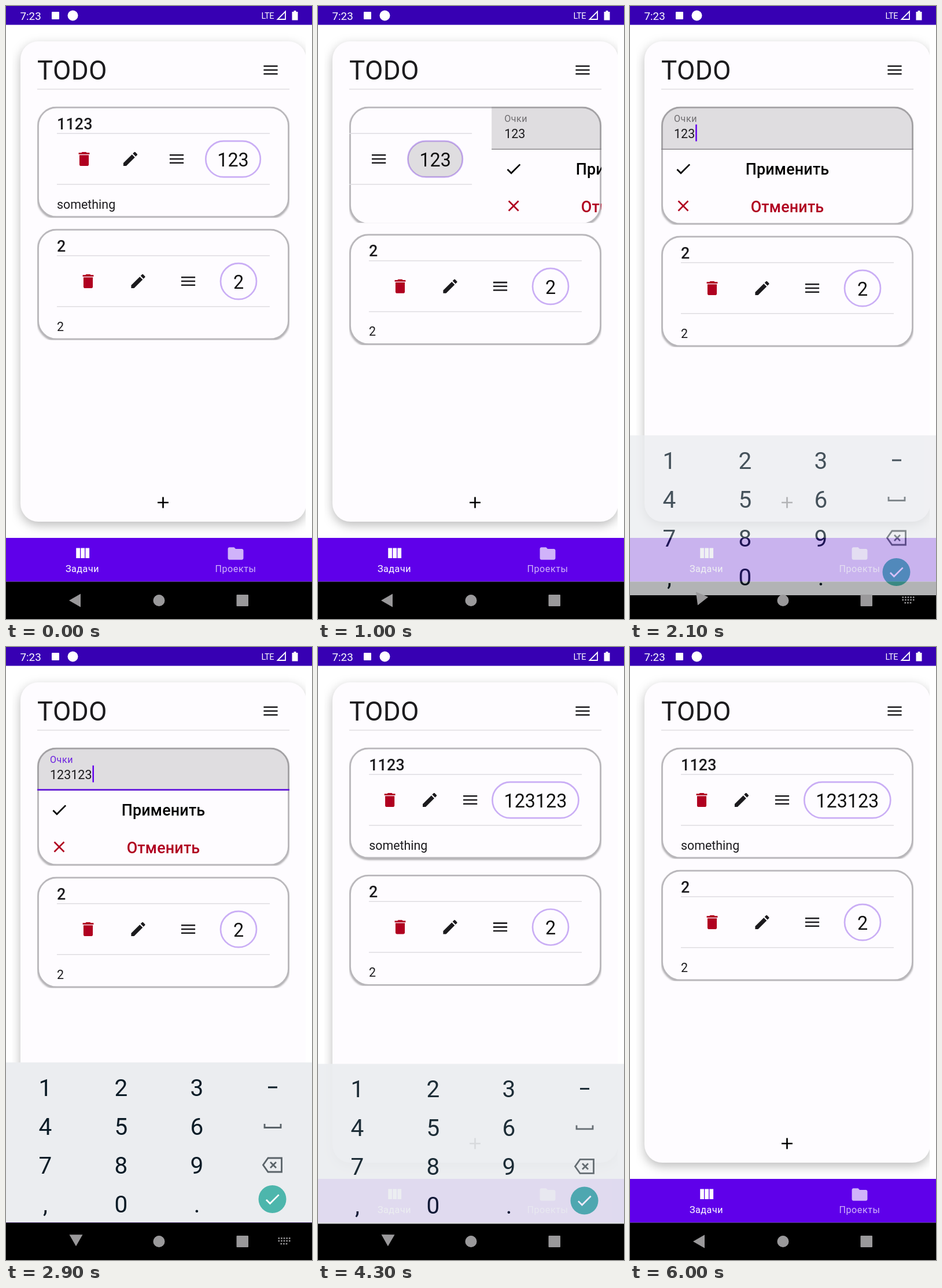
An HTML page for the animation above (6100 ms loop, 529 px wide and 1058 px high).

```html
<!DOCTYPE html>
<html lang="ru">
<head>
<meta charset="utf-8">
<title>TODO</title>
<style>
html, body { margin: 0; width: 100%; height: 100%; overflow: hidden; background: #fff; }
svg { font-family: Roboto, "Noto Sans", sans-serif; }
#stage { display: block; width: 100vw; height: 100vh; }
.sheet { filter: drop-shadow(0 6px 9px #0004); }
.card { filter: drop-shadow(0 2px 1.5px #0005); }
.mid { text-anchor: middle; }
</style>
</head>
<body>
<svg id="stage" viewBox="0 0 529 1058"></svg>
<script>
const LOOP = 6100, WIDTH = 436, LOW = 192, HIGH = 204;
const INK = '#1c1b1e', RED = '#b00020', PURPLE = '#6200ee', PAPER = '#fefcff', LINE = '#dfdde1';
const TYPED_AT = [2400, 2600, 2800];

const ICONS = {
  trash: 'M6 19c0 1.1.9 2 2 2h8c1.1 0 2-.9 2-2V7H6zM19 4h-3.5l-1-1h-5l-1 1H5v2h14z',
  pencil: 'M3 17.25V21h3.75L17.81 9.94l-3.75-3.75zM20.71 7.04c.39-.39.39-1.02 0-1.41l-2.34-2.34c-.39-.39-1.02-.39-1.41 0l-1.83 1.83 3.75 3.75z',
  menu: 'M3 18h18v-2H3zM3 13h18v-2H3zM3 6v2h18V6z',
  check: 'M9 16.17L4.83 12l-1.42 1.41L9 19 21 7l-1.41-1.41z',
  close: 'M19 6.41L17.59 5 12 10.59 6.41 5 5 6.41 10.59 12 5 17.59 6.41 19 12 13.41 17.59 19 19 17.59 13.41 12z',
  plus: 'M19 13h-6v6h-2v-6H5v-2h6V5h2v6h6z',
  columns: 'M10 18h5V5h-5zM4 18h5V5H4zM16 5v13h5V5z',
  folder: 'M10 4H4c-1.1 0-2 .9-2 2v12c0 1.1.9 2 2 2h16c1.1 0 2-.9 2-2V8c0-1.1-.9-2-2-2h-8z'
};

const icon = (name, x, y, fill = INK) =>
  `<path d="${ICONS[name]}" fill="${fill}" transform="translate(${x} ${y}) scale(1.345) translate(-12 -12)"/>`;
const text = (s, x, y, size, fill = INK, extra = '') =>
  `<text x="${x}" y="${y}" font-size="${size}" fill="${fill}" ${extra}>${s}</text>`;
const rect = (x, y, w, h, fill, extra = '') =>
  `<rect x="${x}" y="${y}" width="${w}" height="${h}" fill="${fill}" ${extra}/>`;

const MID = 'class="mid"';
const BOLD = 'font-weight="500" letter-spacing=".2"';
const SMALL = 'letter-spacing=".54"';

// Task face, in card coordinates
const task = (title, note, points, xs, pillX, pillW, press = '') => {
  const pill = (fill, extra) => rect(pillX, 59.7, pillW, 62, fill, `rx="31" ${extra}`);
  return text(title, 34, 39, 26.8, INK, BOLD) +
    rect(34, 45.7, 368, 1.5, LINE) + rect(34, 133.5, 368, 1.5, LINE) +
    icon('trash', xs[0], 90.5, RED) + icon('pencil', xs[1], 90.5) + icon('menu', xs[2], 90.5) +
    pill('none', 'stroke="#caaef5" stroke-width="2.7"') +
    text(points, pillX + pillW / 2, 103.5, 32.3, '#111', MID) +
    (press && pill('#000', `id="${press}" opacity="0"`)) +
    text(note, 34, 176, 21.4);
};

const form =
  rect(0, 0, WIDTH, 74, '#000', 'opacity=".12"') +
  text('Очки', 22, 26, 16.1, '#6d6b6e', `id="label" ${SMALL}`) +
  text('', 22, 54, 21.5, INK, 'id="value"') +
  rect(0, 31, 2.5, 29, PURPLE, 'id="cursor"') +
  rect(0, 73, WIDTH, 1.4, '#858387') +
  rect(0, 71.5, WIDTH, 2.8, '#6a1fe0', 'id="underline"') +
  rect(0, 75, WIDTH, 64, '#000', 'id="applyPress" opacity="0"') +
  icon('check', 38, 107.5, '#000') + text('Применить', 218, 117.5, 26.8, '#000', `${MID} ${BOLD}`) +
  icon('close', 38, 171.5, RED) + text('Отменить', 218, 182, 26.8, RED, `${MID} ${BOLD}`);

const card = (id, body) =>
  `<svg id="${id}" x="54" y="173.5" width="${WIDTH}" height="${LOW}">` +
  rect(1.5, 1.5, WIDTH - 3, LOW - 3, PAPER, `id="${id}Box" rx="32" stroke="#b9b7bb" stroke-width="2.8" class="card"`) +
  body + '</svg>';

const KEYS = ['123', '456', '789', ',0.'];
const keyboard =
  rect(0, 717, 529, 276, '#ebedf0') +
  KEYS.map((row, r) => [...row].map((k, c) =>
    text(k, 68 + c * 131, 774.5 + r * 67, 40.5, '#0b1c27', MID)).join('')).join('') +
  rect(453, 758.5, 16, 3, '#0b1c27') +
  `<g fill="none" stroke="#5a6369" stroke-width="2.8">
    <path d="M447 823v6.5h28V823"/>
    <path d="M453 882h23.500v24H453l-8.500-12zM457 889l10 10m0-10l-10 10"/>
  </g>
  <circle cx="460.500" cy="953" r="24" fill="#4db6ac"/>` +
  icon('check', 460.5, 953, '#fff');

const stage = document.getElementById('stage');
stage.innerHTML =
  `<clipPath id="round"><rect id="roundBox" width="${WIDTH}" height="${LOW}" rx="33"/></clipPath>` +
  rect(0, 0, 529, 1058, '#fff') +
  '<svg x="11" y="33" width="507" height="885" viewBox="11 33 507 885">' +
    rect(25, 61, 494, 829, PAPER, 'rx="31" class="sheet"') + '</svg>' +
  // Status bar
  rect(0, 0, 529, 32.5, '#3700b3') + text('7:23', 24.5, 23.5, 18.8, '#fff') +
  rect(79, 10, 13, 13, '#fff', 'rx="1"') + '<circle cx="115.500" cy="16.500" r="9" fill="#fff"/>' +
  text('LTE', 441.5, 21.5, 14.5, '#fff', 'letter-spacing="-.4"') +
  '<path d="M469.500 23H483V9.500z" fill="none" stroke="#fff" stroke-width="1.8"/>' +
  '<path d="M494.500 10h3V8h4v2h3v14.500h-10z" fill="#fff"/>' +
  // Header and list
  text('TODO', 54, 127, 45.7, INK, 'letter-spacing=".3"') + icon('menu', 457.5, 110.5) +
  rect(54, 142.8, WIDTH, 1.5, LINE) +
  card('first', '<g clip-path="url(#round)">' +
    `<g id="before">${task('1123', 'something', '123', [81, 161, 241], 291.3, 94.5, 'pillPress')}</g>` +
    `<g id="form">${form}</g>` +
    `<g id="after">${task('1123', 'something', '123123', [70, 139, 209], 247.3, 149)}</g></g>`) +
  card('second', task('2', '2', '2', [88, 174.5, 261], 317, 62)) +
  icon('plus', 271.5, 857, '#000') +
  // Bottom tabs
  rect(0, 918, 529, 75.5, '#5f00ea') +
  icon('columns', 132, 945, '#fff') + text('Задачи', 132, 977, 16.1, '#fff', `${MID} ${SMALL}`) +
  icon('folder', 397, 945, '#d0b3fa') + text('Проекты', 397, 977, 16.1, '#d0b3fa', `${MID} ${SMALL}`) +
  rect(0, 993.5, 529, 65, '#000') +
  `<g id="keyboard">${keyboard}</g>` +
  `<g fill="#9a999b">
    <path id="back" d="M109 1026l20-11.500v23z"/>
    <circle cx="264.500" cy="1026" r="10"/>
    <rect x="398.500" y="1016" width="20.500" height="20" rx="1"/>
    <path id="switcher" d="M470.500 1020.500h21M470.500 1025h21M474.500 1030h13" stroke="#9a999b" stroke-width="2.5" stroke-dasharray="2.600 2"/>
  </g>`;

const el = Object.fromEntries([...stage.querySelectorAll('[id]')].map(n => [n.id, n]));
const set = (id, attrs) => { for (const k in attrs) el[id].setAttribute(k, attrs[k]); };
const ramp = (t, from, to) => Math.min(1, Math.max(0, (t - from) / (to - from)));
// Critically damped spring
const spring = (t, start, speed = 20) => {
  const x = Math.max(0, t - start) / 1000 * speed;
  return x > 12 ? 1 : 1 - (1 + x) * Math.exp(-x);
};
const slide = (id, x) => set(id, {
  transform: `translate(${x} 0)`,
  visibility: Math.abs(x) > WIDTH - .5 ? 'hidden' : 'visible'
});

function draw(t) {
  const open = spring(t, 927), shut = spring(t, 3785);
  slide('before', -WIDTH * open);
  slide('form', WIDTH * (1 - open - shut));
  slide('after', WIDTH * (1 - shut));

  const boxH = t > 927 && t < 4245 ? HIGH : LOW;
  const height = LOW + (HIGH - LOW) * (spring(t, 927, 35) - spring(t, 4245));
  set('first', { height: Math.max(height, LOW) });
  set('firstBox', { height: boxH - 3 });
  set('roundBox', { height: boxH });
  set('second', { y: 192.5 + height });

  set('pillPress', { opacity: .12 * ramp(t, 700, 800) });
  set('applyPress', { opacity: .1 * ramp(t, 3600, 3700) });

  const typed = TYPED_AT.filter(at => t >= at);
  const value = '123' + '123'.slice(0, typed.length);
  el.value.textContent = value;
  const lastEdit = typed.length ? typed[typed.length - 1] : 2050;
  set('cursor', {
    x: 1 + value.length * 12.08 + 22,
    opacity: t >= 2050 && (t - lastEdit) % 1000 < 500 ? 1 : 0
  });
  const focused = ramp(t, 2100, 2250);
  set('underline', { opacity: focused });
  set('label', { fill: focused > .5 ? '#6a1fe0' : '#6d6b6e' });

  const shown = ramp(t, 1950, 2150) - ramp(t, 4290, 4430);
  set('keyboard', { opacity: shown, transform: `translate(0 ${400 * (1 - shown) ** 2})` });
  const turn = ramp(t, 1950, 2150) - ramp(t, 4300, 4500);
  set('back', { transform: `rotate(${-90 * turn} 119.1 1024.1)` });
  set('switcher', { opacity: t >= 1980 && t < 4290 ? 1 : 0 });
}

const start = performance.now();
function tick() {
  draw((performance.now() - start) % LOOP);
  requestAnimationFrame(tick);
}
tick();
</script>
</body>
</html>
```
